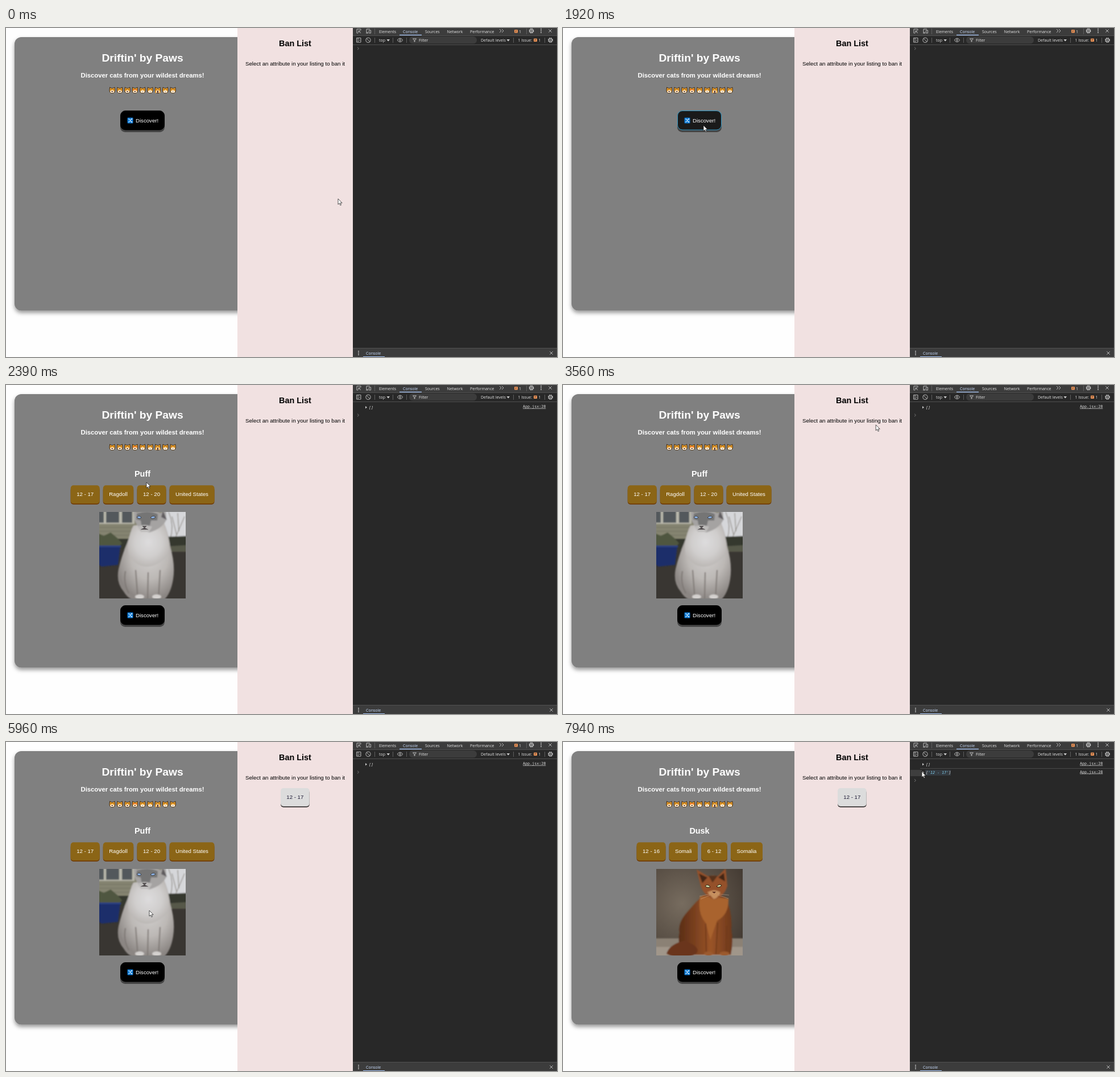
An HTML page that plays this animation: 969 by 578 pixels, repeating every 8 s.

```html
<!DOCTYPE html>
<html lang="en">
<head>
<meta charset="utf-8">
<style>
html, body { margin: 0; width: 969px; height: 578px; overflow: hidden; background: #fefefe; }
svg { display: block; }
text { font: 9.65px "Liberation Sans", Arial, sans-serif; white-space: pre; }
.mid { text-anchor: middle; }
.h1 { font-size: 19.2px; font-weight: bold; }
.h2 { font-size: 14.4px; font-weight: bold; }
.h3 { font-size: 11.25px; font-weight: bold; }
.ui { font: 500 7px "Open Sans", "Noto Sans", sans-serif; fill: #e3e3e3; }
.mono { font: 6.7px "DejaVu Sans Mono", monospace; fill: #dcdcdc; }
.out { font-style: italic; }
.icon { fill: none; stroke: #c7c7c7; stroke-width: .9; }
</style>
</head>
<body>
<svg id="stage" width="969" height="578" viewBox="0 0 969 578">
  <defs>
    <clipPath id="frame"><path d="M0 0H152V152H0z"/></clipPath>
    <filter id="shade" x="-10%" y="-10%" width="120%" height="120%">
      <feDropShadow dx="0" dy="4" stdDeviation="3.5" flood-opacity=".4"/>
    </filter>
    <filter id="soft"><feGaussianBlur stdDeviation="1.1"/></filter>
    <radialGradient id="studio" cx=".3" cy=".4" r=".8">
      <stop stop-color="#776c5f"/><stop offset="1" stop-color="#443b33"/>
    </radialGradient>
    <radialGradient id="fur" cx=".56" cy=".38" r=".62">
      <stop stop-color="#d3d1d0"/><stop offset=".55" stop-color="#bcb8b5"/><stop offset="1" stop-color="#8b8683"/>
    </radialGradient>
    <radialGradient id="mane" cx=".5" cy=".45" r=".55">
      <stop stop-color="#dddcdd"/><stop offset=".6" stop-color="#d0cecd"/><stop offset="1" stop-color="#bcb8b5"/>
    </radialGradient>
    <linearGradient id="red" x2="1" y2="0">
      <stop stop-color="#5a2d16"/><stop offset=".6" stop-color="#9a5428"/><stop offset="1" stop-color="#6d381b"/>
    </linearGradient>
    <g id="face">
      <path d="M-4.6-5.2-1.8-3.4H1.8L4.6-5.2 5.2 0Q5 5.2 0 5.2T-5.2 0z" fill="#f5a52c" stroke="#2b1a0c" stroke-width=".9"/>
      <ellipse cy="2.4" rx="3.8" ry="2.3" fill="#fff3df"/>
    </g>
    <g id="gear" class="icon"><circle r="3.6" stroke-dasharray="1.9 .93" stroke-width="1.6"/><circle r="2.9"/><circle r="1.1"/></g>
    <path id="cross" class="icon" d="M-2.7-2.7 2.7 2.7M2.7-2.7-2.7 2.7"/>
    <g id="dots" fill="#d0d0d0"><circle cy="-3" r=".9"/><circle r=".9"/><circle cy="3" r=".9"/></g>
    <g id="issue"><rect width="6" height="5.5" rx="1" fill="#f29455"/><path d="M1.5 1.8H4.5M1.5 3.4H3.5" stroke="#3c3c3c" stroke-width=".8"/></g>

    <g id="photo1" clip-path="url(#frame)">
      <path d="M0 0H152V152H0z" fill="#393632"/>
      <g filter="url(#soft)">
        <path d="M-5-5H125V48H-5z" fill="#858471"/>
        <path d="M0 27H70M0 34H70M0 41H70" stroke="#6f6f5f"/>
        <path d="M-5-5H62V21H-5z" fill="#b9b8ac"/>
        <path d="M-5-5H8V19H-5zM12-5H35V19H12zM40-5H58V19H40z" fill="#53585c"/>
        <path d="M112-5H160V45H112z" fill="#d6d7da"/>
        <path d="M124 50Q133 25 122 0M132 50 150 8M136 40 128 8M140 34 138 2" fill="none" stroke="#777166"/>
        <path d="M-5 47H60L110 44 160 42V66H-5z" fill="#34382f"/>
        <path d="M110 61 160 58V70H110z" fill="#565948"/>
        <path d="M-5 36 8 42 20 36 32 46 40 55 30 66H-5z" fill="#50563f"/>
        <path d="M-5 60H37L33 93 4 96-5 90z" fill="#1c2d6b"/>
        <path d="M-5 59H38V62H-5z" fill="#2c3f80"/>
        <path d="M58 27Q52 48 46 62T34 100Q29 124 43 140 52 155 65 155H113Q126 144 130 118T125 62Q122 40 116 25z" fill="url(#fur)"/>
        <path d="M60 24Q46 55 52 75 66 98 86 96T122 74Q125 50 114 18z" fill="url(#mane)"/>
        <path d="M64 102 68 155M86 106 85 155M107 102 104 155M46 104Q42 125 52 143" fill="none" stroke="#7d7773" stroke-width="2"/>
        <path d="M60-8 66 1Q88-8 108 2L117-5 118 14Q110 30 88 36 68 31 62 14z" fill="#a5a3a2"/>
        <path d="M112-2 119 14 109 9z" fill="#5f5c5e"/>
        <path d="M66 3Q86-4 103 4L102 15 91 15 88 28 75 28 73 15 65 13z" fill="#747475"/>
        <path d="M67 26Q79 20 93 26L88 35H73z" fill="#bdbbba"/>
        <ellipse cx="71" cy="149" rx="8" ry="4" fill="#d4d1cf"/><ellipse cx="101" cy="149" rx="8" ry="4" fill="#d4d1cf"/>
      </g>
      <path d="M66 9Q71 5 74 10 70 14 66 9M90 10Q95 5 99 9 94 14 90 10" fill="#8aaee0" stroke="#333" stroke-width=".8"/>
      <path d="M76 25H83L79.5 28zM73 31 79.5 28 86 31" fill="#4d4849" stroke="#4d4849" stroke-width=".7"/>
    </g>

    <g id="photo2" clip-path="url(#frame)">
      <path d="M0 0H152V152H0z" fill="url(#studio)"/>
      <g filter="url(#soft)">
        <path d="M-5 122H160V160H-5z" fill="#8b8175"/>
        <path d="M-5 137H160V160H-5z" fill="#a0968a"/>
        <path d="M82 46Q66 62 52 79T41 112Q35 138 54 151H131Q136 129 132 106 134 76 122 49z" fill="url(#red)"/>
        <path d="M77 48Q72 78 87 95L95 125 107 91Q128 80 127 52z" fill="#a9632f"/>
        <path d="M50 126Q23 132 18 149 36 160 65 152 80 144 65 133z" fill="#6a351b"/>
        <path d="M87 96 88 150M108 94 105 150M124 100 123 150" stroke="#713a1b" stroke-width="2"/>
        <path d="M78 29 71 1 91 13Q101 10 108 13L122-1 125 30Q119 49 102 54 83 47 78 29z" fill="#95512b"/>
        <path d="M75 8 81 25 90 15zM119 7 109 15 121 22z" fill="#432719"/>
        <path d="M92 12 99 24 108 12z" fill="#56301e"/>
        <path d="M90 41Q102 34 113 41 107 53 101 53z" fill="#c6905f"/>
        <ellipse cx="92" cy="149" rx="8" ry="4" fill="#9b5a2e"/><ellipse cx="120" cy="149" rx="9" ry="4" fill="#9b5a2e"/>
      </g>
      <path d="M86 30Q91 25 95 32 89 34 86 30M106 31Q111 25 115 29 111 34 106 31" fill="#c9d2a0" stroke="#2b190f"/>
      <path d="M98 40H105L102 43z" fill="#5b2d20"/>
      <path d="M95 44 76 48M95 46 78 53M109 44 128 46M109 46 127 52" stroke="#d9bea5" stroke-width=".4"/>
    </g>
  </defs>

  <rect x="15" y="16" width="450" height="480.5" rx="12" fill="#808080" filter="url(#shade)"/>
  <g fill="#fff" class="mid">
    <text class="h1" x="240" y="58.5">Driftin' by Paws</text>
    <text class="h3" x="240" y="87">Discover cats from your wildest dreams!</text>
  </g>
  <g id="cats"></g>
  <g id="list1"></g>
  <g id="list2"></g>
  <g id="button">
    <rect x="201" y="149" width="78" height="34" rx="8.5" fill="#454545"/>
    <rect id="top" x="201.5" y="145.5" width="77" height="33.5" rx="8.5"/>
    <rect x="213.5" y="157.5" width="10" height="10" rx="1" fill="#0878d4"/>
    <path d="M215 160H217L220 165H222M215 165H217L220 160H222M220.8 158.8 222 160 220.8 161.2M220.8 163.8 222 165 220.8 166.2" fill="none" stroke="#fff" stroke-width=".9"/>
    <text x="228" y="166" fill="#fff">Discover!</text>
  </g>

  <path d="M407 0H610V578H407z" fill="#f1e1e1"/>
  <g class="mid">
    <text class="h2" x="508.5" y="31.5">Ban List</text>
    <text x="508.5" y="65.5" style="font-size:9.72px">Select an attribute in your listing to ban it</text>
  </g>
  <g id="ban"></g>

  <path d="M610 0H969V578H610z" fill="#282828"/>
  <path d="M610 0H969V13H610zM610 562H969V578H610z" fill="#3c3c3c"/>
  <path d="M610 13.5H969M610 29.5H969M610 562.5H969" stroke="#505050"/>
  <rect x="709" y="15" width="119" height="12.5" rx="6" fill="#3c3c3c"/>
  <path d="M648.5 1V11M915.5 1V11M648.5 17V26M680.5 17V26M704.5 17V26M892.5 17V26M947.5 17V26" stroke="#5e5e5e"/>
  <path d="M692 12.3H731M628 577.7H666" stroke="#a8c7fa" stroke-width="1.3"/>
  <g class="icon">
    <path d="M624 4V2H617V9H619M620 5 624 9M620 8.5V5H623.5"/>
    <path d="M640 2H634V8H637M633 9H637M638.5 4H641.5V9H638.5z"/>
    <path d="M868 2 871 5 868 8M872 2 875 5 872 8"/>
    <path d="M616.5 17.5H624V25H616.5zM619 17.5V25M621 21.3H623"/>
    <circle cx="637" cy="21.3" r="4.1"/><path d="M634 18.4 640 24.2"/>
    <path d="M688 21.3Q693 14.8 698 21.3 693 27.8 688 21.3z"/><circle cx="693" cy="21.3" r="1.5"/>
    <path d="M715.5 18.8H721.5L719 21.6V24H718V21.6z"/>
  </g>
  <path d="M669.5 20H675L672.2 23.4zM880.5 20H886L883.2 23.4z" fill="#d0d0d0"/>
  <use href="#issue" x="894" y="3"/><use href="#issue" x="928" y="18.5"/>
  <use href="#gear" x="924" y="5"/><use href="#gear" x="957.5" y="21.3"/>
  <use href="#dots" x="941" y="5"/><use href="#dots" x="620" y="571"/>
  <use href="#cross" x="957" y="5"/><use href="#cross" x="959" y="571"/>
  <g id="labels"></g>

  <g id="hot"><path d="M611 49H631V60H611z" fill="#3e3e3e"/><path d="M637 49H682V59H637z" fill="#343a40"/></g>
  <g id="logs"></g>
  <path id="prompt" class="icon" d="M618-2.3 620.5 0 618 2.3" style="stroke:#8a8a8a;stroke-width:.8"/>
  <path id="cursor" d="M0 0V10L2.3 7.9 3.9 11.5 5.5 10.8 3.9 7.3H7.1z" fill="#fff" stroke="#111" stroke-width=".7"/>
</svg>
<script>
const $ = id => document.getElementById(id);
const show = (id, on) => $(id).style.display = on ? '' : 'none';
const move = (id, x, y) => $(id).setAttribute('transform', `translate(${x} ${y})`);

const chip = (x, w, label, y, fill, edge, ink) => `
  <rect x="${x}" y="${y + 3}" width="${w}" height="30.7" rx="5" fill="${edge}"/>
  <rect x="${x}" y="${y}" width="${w}" height="32" rx="5" fill="${fill}"/>
  <text class="mid" x="${x + w / 2}" y="${y + 18.7}" fill="${ink}">${label}</text>`;

const listing = (name, chips, photo) =>
  `<text class="h2 mid" x="240" y="161" fill="#fff">${name}</text>` +
  chips.map(([x, w, label]) => chip(x, w, label, 176.3, '#8b6516', '#713d08', '#fff')).join('') +
  `<use href="#${photo}" x="164" y="223"/>`;

$('list1').innerHTML = listing('Puff',
  [[113.7, 51, '12 - 17'], [170.7, 53.5, 'Ragdoll'], [230.5, 51, '12 - 20'], [287.5, 79, 'United States']], 'photo1');
$('list2').innerHTML = listing('Dusk',
  [[129.5, 51, '12 - 16'], [186.5, 50.5, 'Somali'], [243.2, 45.6, '6 - 12'], [295, 56, 'Somalia']], 'photo2');
$('ban').innerHTML = chip(483, 50.7, '12 - 17', 81, '#dcdcdc', '#3c3838', '#1c1833');

$('cats').innerHTML = Array.from({ length: 9 }, (_, i) => `
  <g transform="translate(${186.8 + i * 13.35} 109.3) scale(.92 1)"><use href="#face"/>
    <path d="M-2.2-1.4v1.2M2.2-1.4v1.2" stroke="${i === 3 ? '#d3202c' : '#2b1a0c'}" stroke-width="${i === 3 ? 2.4 : 1.2}"/>
    ${i < 4 ? '<path d="M-2.2 1.8H2.2Q0 5 -2.2 1.8" fill="#5a2a18"/>'
      : i === 6 ? '<ellipse cy="2.8" rx="1.5" ry="2" fill="#5a2a18"/><path d="M-4 1V5M4 1V5" stroke="#f5a52c" stroke-width="2"/>'
      : '<path d="M-1.5 2.5Q0 3.5 1.5 2.5" fill="none" stroke="#5a2a18" stroke-width=".7"/>'}
  </g>`).join('');

$('labels').innerHTML = [
  [656, 8.5, 'Elements'], [698, 8.5, 'Console'], [737, 8.5, 'Sources'], [775.5, 8.5, 'Network'],
  [816, 8.5, 'Performance'], [902, 8.7, '1'], [656, 24, 'top'], [726, 24, 'Filter'],
  [835, 24, 'Default levels'], [900.5, 24, '1 Issue:'], [936.5, 24, '1'], [633, 574.3, 'Console']
].map(([x, y, s]) => `<text class="ui" x="${x}" y="${y}"${s === 'Console' ? ' style="fill:#c9dcfb"' : ''}>${s}</text>`).join('');

const log = (id, y, body) => `<g id="${id}">
  <path d="M632 ${y - 2.2}v4.4l3-2.2z" fill="#c7c7c7"/>
  <text class="mono out" x="638" y="${y + 2.3}">${body}</text>
  <text class="mono" x="909" y="${y + .8}" text-decoration="underline">App.jsx:28</text></g>`;
$('logs').innerHTML = log('log1', 39.3, '[]') +
  log('log2', 53.8, `[<tspan fill="#7fcfee">'12 - 17'</tspan>]`) +
  '<path id="rule" d="M628 46.5H969" stroke="#4a4a4a"/>';

// Pointer moves: start time, 70 ms steps, end x, end y, ease-out power
const moves = [
  [660, 12, 325, 181, 1.1], [1500, 7, 247, 171, 2], [3140, 12, 625, 45, 1.85],
  [4180, 7, 213, 160, 1.4], [4670, 4, 142, 188, 1.6],
  [5750, 4, 252, 296, 1.2], [6030, 7, 245, 393, 2],
  [7100, 12, 630, 57, 1.85], [7940, 1, 631, 52, 1]
];

function pointer(t) {
  let x = 584, y = 300;
  for (const [start, n, tx, ty, power] of moves) {
    if (t < start) break;
    const u = Math.min(n, Math.floor((t - start) / 70) + 1) / n;
    const e = 1 - (1 - u) ** power;
    x += (tx - x) * e;
    y += (ty - y) * e;
  }
  return [x, y];
}

function draw(t) {
  const found = t >= 2190, next = t >= 6650;
  const [x, y] = pointer(t);
  const top = found ? 387 : 145;
  const hover = x > 201 && x < 279 && y > top && y < top + 34;
  const pressed = (t >= 2120 && !found) || (t >= 6580 && !next);
  show('list1', found && !next);
  show('list2', next);
  show('ban', t >= 5480);
  show('log1', found);
  show('log2', next);
  show('rule', next);
  show('hot', t >= 7940);
  move('prompt', 0, next ? 67.5 : found ? 53 : 36);
  move('button', 0, top - 145 + (pressed ? 2 : 0));
  $('top').setAttribute('fill', hover ? '#1a1a1a' : '#000');
  $('top').setAttribute('stroke', hover ? '#3298c4' : '#000');
  move('cursor', x, y);
}

const begin = performance.now();
function tick() {
  draw((performance.now() - begin) % 8000);
  requestAnimationFrame(tick);
}
tick();
</script>
</body>
</html>
```
